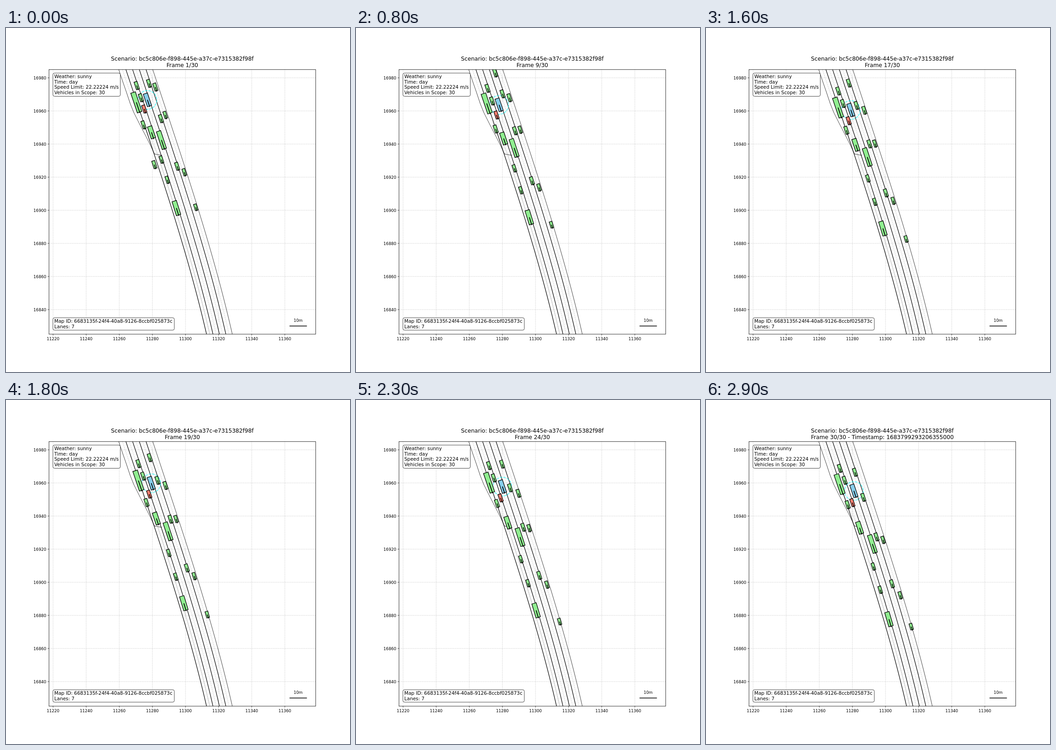
An HTML page with a canvas for the animation above (3000 ms loop, 748 by 748 pixels).

```html
<!DOCTYPE html>
<html lang="en">
<head>
<meta charset="utf-8">
<title>Traffic scenario</title>
<style>
html, body { margin: 0; height: 100%; overflow: hidden; background: #fff; }
canvas { display: block; }
</style>
</head>
<body>
<canvas id="stage" width="748" height="748"></canvas>
<script>
const ctx = document.getElementById('stage').getContext('2d');
const LEFT = 93.5, TOP = 90.3, RIGHT = 673.3, BOTTOM = 665.8;
const KEYS = [0, 8, 21, 29];

// Each car: x at start and end, then y at the four key steps; "until" hides it early.
const groups = [
  { len: 17, wid: 6.8, cars: [
    [284.3, 291, 125, 131, 140.5, 148.5],
    [311, 342, 120.3, 143, 184, 211.5],
    [295, 324, 76, 97.5, 133.5, 157],
    [293.5, 301.5, 151.5, 158.5, 167.5, 174.5],
    [337, 370.7, 197, 223.3, 269.7, 297.5],
    [372.2, 404.5, 300.5, 332, 375, 399.5],
    [299, 308, 210.5, 219.5, 224, 227.5]] },
  { len: 17, wid: 6.8, until: 24, cars: [[324.7, 361, 128.3, 151.5, 196, 223]] },
  { len: 17, wid: 6.8, until: 2, cars: [[322.6, 335, 297, 317, 349, 369]] },
  { len: 15.5, wid: 6.2, cars: [
    [346.3, 385, 189, 221, 270, 304],
    [338, 364, 286, 305, 340.7, 362],
    [350.8, 379, 330, 352.7, 393.5, 412.5],
    [387.7, 422.3, 313.5, 346.5, 393.7, 424.5]] },
  { len: 14, wid: 6.2, cars: [[412.7, 446.3, 389.7, 427.7, 478, 492.7]] },
  { len: 45, wid: 10.5, cars: [[283.4, 290.5, 161.6, 164, 178.5, 183]] },
  { len: 27, wid: 9.8, cars: [[316.4, 334, 226.7, 240.2, 262.7, 277.7]] },
  { len: 40.5, wid: 9.8, cars: [[338, 361.8, 243.6, 260.8, 293, 313]] },
  { len: 31.8, wid: 10, cars: [[370.5, 397.8, 391.5, 411.5, 451, 476.5]] },
  { len: 17, wid: 6.8, fill: '#fa8072', cars: [[300.7, 318.3, 176, 189, 209.3, 223]] },
  { len: 28.5, wid: 9.5, fill: '#87ceeb', ring: true, cars: [[307.5, 321.5, 156.2, 167, 185, 197.5]] }
];

function stroke(points, color, width, dash = []) {
  ctx.beginPath();
  points.forEach(([x, y]) => ctx.lineTo(x, y));
  ctx.strokeStyle = color;
  ctx.lineWidth = width;
  ctx.setLineDash(dash);
  ctx.stroke();
  ctx.setLineDash([]);
}

function text(str, x, y, size, align = 'left') {
  ctx.font = `${size}px "DejaVu Sans", sans-serif`;
  ctx.textAlign = align;
  ctx.fillStyle = '#000';
  ctx.fillText(str, x, y);
}

function textBox(x, y, w, h, lines) {
  ctx.beginPath();
  ctx.roundRect(x, y, w, h, 3.5);
  ctx.fillStyle = 'rgba(255,255,255,.8)';
  ctx.fill();
  ctx.strokeStyle = 'rgba(0,0,0,.8)';
  ctx.lineWidth = 0.9;
  ctx.stroke();
  lines.forEach((line, i) => text(line, 105, y + 11 + i * 11.6, 10.39));
}

// x of the road line with the given lane index at height y
function roadX(lane, y) {
  const v = (y - 90) / 576;
  return 260.6 + lane * (14.6 - 0.6 * v) + v * (192 + v * (10 - 26.5 * v));
}

function roadLine(lane, color, width, dash, from = 90) {
  const points = [];
  for (let y = from; y <= 666; y += 6) points.push([roadX(lane, y), y]);
  stroke(points, color, width, dash);
}

function drawRoad() {
  const center = 'rgba(128,128,128,.55)', dashes = [2.8, 1.4];
  for (let lane = 1.5; lane < 4; lane++) roadLine(lane, center, 0.75, dashes);
  roadLine(0.5, center, 0.75, dashes);
  roadLine(0.5, center, 0.75, [], 276);
  stroke([[253, 90], [268, 135], [284, 180], [308, 228], [330, 275]], center, 0.75, dashes);
  for (let lane = 0; lane < 4; lane++) roadLine(lane, '#000', 1.15);
  roadLine(4, 'rgba(0,0,0,.75)', 1);
  stroke([[245, 90], [253, 114], [262, 140], [270, 164], [278, 184], [290, 208],
    [304, 235], [315, 257], [323, 274], [339, 277]], 'rgba(0,0,0,.75)', 1);
}

function drawGrid() {
  for (let i = 0; i < 8; i++) {
    const x = 102.3 + 72 * i, y = 108.3 + 72 * i;
    const grid = 'rgba(176,176,176,.6)', dash = [2.6, 1.2];
    stroke([[x, BOTTOM], [x, TOP]], grid, 0.8, dash);
    stroke([[LEFT, y], [RIGHT, y]], grid, 0.8, dash);
    stroke([[x, BOTTOM], [x, BOTTOM + 3]], '#000', 0.7);
    stroke([[LEFT - 3, y], [LEFT, y]], '#000', 0.7);
    text(11220 + 20 * i, x, 679, 8.66, 'center');
    text(16980 - 20 * i, 87.4, y + 3.2, 8.66, 'right');
  }
}

function place([x0, x1, ...ys], step) {
  let k = 0;
  while (k < 2 && step > KEYS[k + 1]) k++;
  const y = ys[k] + (ys[k + 1] - ys[k]) * (step - KEYS[k]) / (KEYS[k + 1] - KEYS[k]);
  return [x0 + (x1 - x0) * (y - ys[0]) / (ys[3] - ys[0]), y];
}

function drawCar(x, y, { len, wid, fill = '#90ee90' }) {
  ctx.save();
  ctx.translate(x, y);
  ctx.rotate(-Math.atan((roadX(0, y + 5) - roadX(0, y - 5)) / 10));
  ctx.fillStyle = fill;
  ctx.fillRect(-wid / 2, -len / 2, wid, len);
  ctx.strokeStyle = '#000';
  ctx.lineWidth = 1.3;
  ctx.strokeRect(-wid / 2, -len / 2, wid, len);
  stroke([[0, 0], [0, len / 2 + 2]], '#000', 1.7);
  ctx.restore();
}

function drawRing(x, y) {
  ctx.beginPath();
  ctx.arc(x, y + 0.3, 20.4, 0, 2 * Math.PI);
  ctx.strokeStyle = 'rgba(0,255,255,.7)';
  ctx.lineWidth = 1.5;
  ctx.setLineDash([5.5, 2]);
  ctx.stroke();
  ctx.setLineDash([]);
}

function draw() {
  const step = Math.floor(performance.now() % 3000 / 100);
  ctx.fillStyle = '#fff';
  ctx.fillRect(0, 0, 748, 748);
  drawGrid();

  ctx.save();
  ctx.beginPath();
  ctx.rect(LEFT, TOP, RIGHT - LEFT, BOTTOM - TOP);
  ctx.clip();
  drawRoad();
  groups.filter(g => g.ring).forEach(g => drawRing(...place(g.cars[0], step)));
  for (const group of groups) {
    if (step >= (group.until ?? 30)) continue;
    group.cars.forEach(car => drawCar(...place(car, step), group));
  }
  ctx.restore();

  ctx.strokeStyle = '#000';
  ctx.lineWidth = 0.8;
  ctx.strokeRect(LEFT, TOP, RIGHT - LEFT, BOTTOM - TOP);

  text('Scenario: bc5c806e-f898-445e-a37c-e7315382f98f', 383.4, 70.7, 12.12, 'center');
  const stamp = step === 29 ? ' - Timestamp: 1683799293206355000' : '';
  text(`Frame ${step + 1}/30${stamp}`, 383.4, 84.7, 12.12, 'center');
  textBox(102, 98, 146.6, 50.5, ['Weather: sunny', 'Time: day',
    'Speed Limit: 22.22224 m/s', 'Vehicles in Scope: 30']);
  textBox(102, 630, 264, 27, ['Map ID: 6683135f-24f4-40a8-9126-8ccbf025873c', 'Lanes: 7']);
  text('10m', 635.3, 638.7, 8.66, 'center');
  stroke([[616.5, 648], [654.3, 648]], '#000', 1.7);
  requestAnimationFrame(draw);
}
draw();
</script>
</body>
</html>
```
